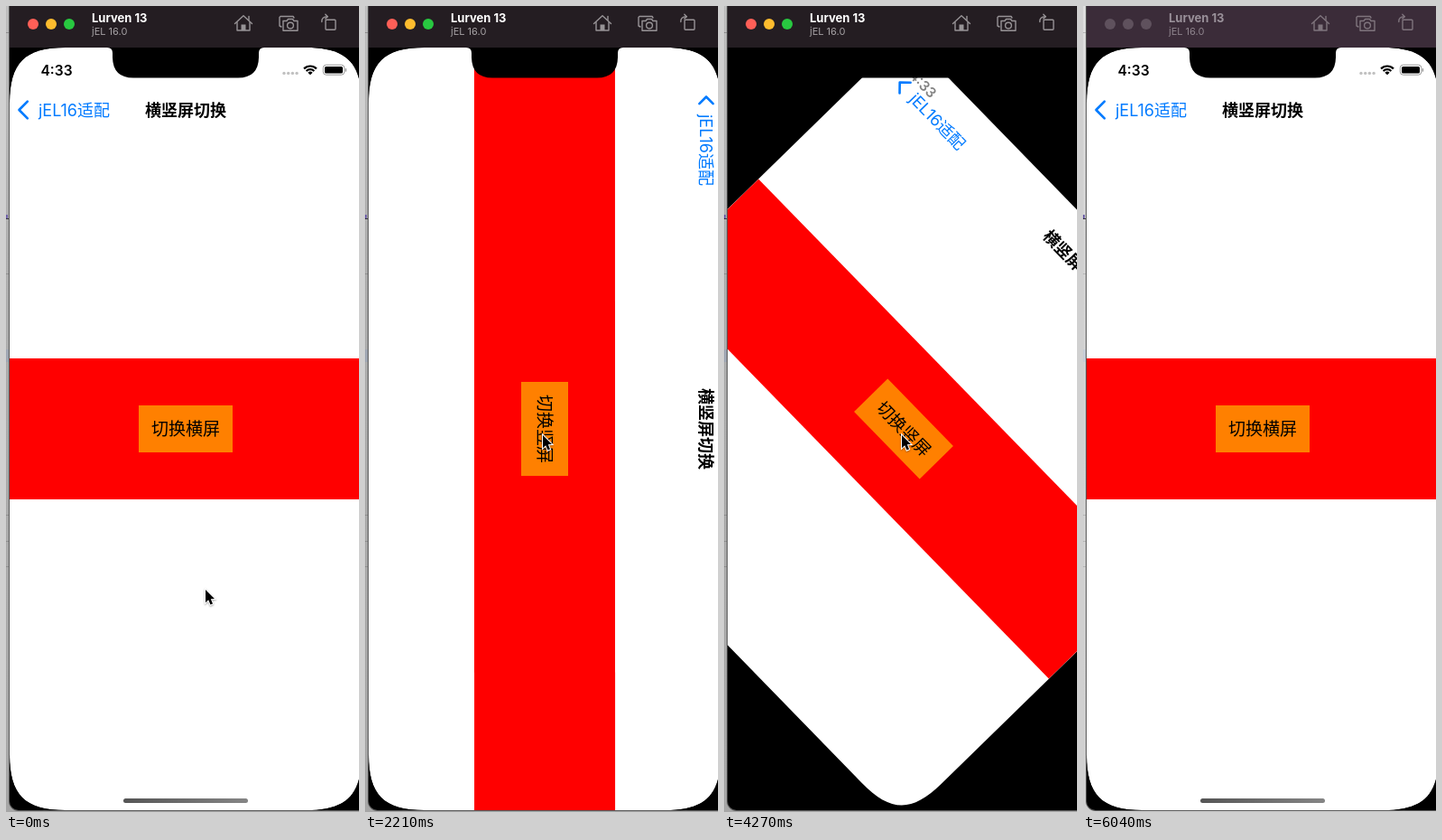
An HTML page with a canvas that plays this animation: 391 px wide and 892 px high, repeating every 6140 ms.

```html
<!DOCTYPE html>
<html lang="zh">
<head>
<meta charset="utf-8">
<title>横竖屏切换</title>
<style>
html, body { margin: 0; width: 100%; height: 100%; overflow: hidden; background: #000; }
canvas { display: block; width: 391px; height: 892px; }
</style>
</head>
<body>
<canvas id="stage" width="391" height="892"></canvas>
<script>
const ctx = document.getElementById('stage').getContext('2d');
const LOOP = 6140, SPIN = 300, INACTIVE = 6040;
const SCREEN = { x: 4, y: 46, w: 390, h: 844 };
const FONT = 'Inter, "Noto Sans CJK SC", "Noto Sans CJK", sans-serif';

const bursts = [
  [140, 580, 4], [880, 1620, 6], [1910, 2500, 5], [3090, 3090, 1],
  [3390, 3830, 4], [4120, 4710, 5], [5000, 5740, 6], [6040, 6040, 1]
];
const ticks = [0];
for (const [from, to, n] of bursts) {
  for (let i = 0; i < n; i++) {
    const t = from + (n > 1 ? (to - from) * i / (n - 1) : 0);
    ticks.push(Math.floor((t + 3) / 10) * 10);
  }
}

// Rotation starts, alternating between landscape and portrait.
const spins = [1902, 3251, 4118.5, 4907];

// Pointer path: time, x, y.
const pointer = [
  [0, 221, 646], [140, 217, 640], [290, 214, 623], [440, 222, 605],
  [580, 230, 594], [880, 236, 589], [1030, 238, 570], [1180, 227, 534],
  [1320, 211, 500], [1470, 200, 480], [1620, 197, 475]
];

const clamp = v => Math.min(1, Math.max(0, v));
const lerp = (a, b, k) => a + (b - a) * k;
const ease = k => (1 - Math.cos(Math.PI * clamp(k))) / 2;

function fillBox(x, y, w, h, color, r = 0) {
  ctx.fillStyle = color;
  ctx.beginPath();
  ctx.roundRect(x, y, w, h, r);
  ctx.fill();
}

function dot(x, y, r, color) {
  ctx.fillStyle = color;
  ctx.beginPath();
  ctx.arc(x, y, r, 0, 7);
  ctx.fill();
}

function line(points, close) {
  ctx.beginPath();
  points.forEach(([x, y]) => ctx.lineTo(x, y));
  if (close) ctx.closePath();
}

function text(str, x, y, size, weight, color, align = 'left') {
  ctx.font = `${weight} ${size}px ${FONT}`;
  ctx.textAlign = align;
  ctx.fillStyle = color;
  ctx.fillText(str, x, y);
}

// Rectangle with continuous corners.
function smoothRect(x, y, w, h) {
  const e = 62, c = 16.7, r = x + w, b = y + h;
  ctx.beginPath();
  ctx.moveTo(x, y + e);
  ctx.bezierCurveTo(x, y + c, x + c, y, x + e, y);
  ctx.lineTo(r - e, y);
  ctx.bezierCurveTo(r - c, y, r, y + c, r, y + e);
  ctx.lineTo(r, b - e);
  ctx.bezierCurveTo(r, b - c, r - c, b, r - e, b);
  ctx.lineTo(x + e, b);
  ctx.bezierCurveTo(x + c, b, x, b - c, x, b - e);
  ctx.closePath();
}

function drawBackdrop(inactive) {
  const shade = ctx.createLinearGradient(0, 0, 0, 892);
  shade.addColorStop(0, inactive ? '#dedede' : '#bdbdbd');
  shade.addColorStop(0.3, inactive ? '#d2d2d2' : '#adadad');
  shade.addColorStop(1, inactive ? '#cfcfcf' : '#a6a6a6');
  fillBox(0, 0, 391, 892, shade);
  fillBox(0, 380, 3, 14, inactive ? '#c6ccd6' : '#9fa6b2');
  for (const y of [29, 296, 563, 592, 620]) fillBox(0, y, 3, 1, inactive ? '#b5b5b5' : '#8e8e8e');
  fillBox(0, 231, 2, 4, '#6f61a8');
  fillBox(0, 235, 3, 1, '#37343f');
  fillBox(3, -20, 420, 911, '#595959', 11);
  fillBox(4, -20, 420, 910, '#000', 10);
}

function drawIcons(color) {
  ctx.strokeStyle = color;
  ctx.lineWidth = 1.4;
  ctx.lineJoin = ctx.lineCap = 'round';
  line([[253.5, 19.5], [263, 10.8], [272.5, 19.5]]); ctx.stroke();
  line([[256, 18], [256, 27], [270, 27], [270, 18]]); ctx.stroke();
  line([[269, 11.5], [269, 15.5]]); ctx.stroke();
  fillBox(260.5, 20.5, 5, 6.5, color);

  line([[305, 23], [303, 22], [303, 12.5], [304, 11.5], [318, 11.5], [319, 13]]); ctx.stroke();
  line([[307, 16.5], [311, 16.5], [312.5, 14.5], [317.5, 14.5], [319, 16.5],
    [323, 16.5], [323, 27.3], [307, 27.3]], true); ctx.stroke();
  ctx.beginPath(); ctx.arc(315, 21.6, 3.4, 0, 7); ctx.stroke();

  ctx.beginPath(); ctx.roundRect(354, 15.2, 11, 11, 1); ctx.stroke();
  ctx.beginPath();
  ctx.moveTo(349.8, 17.5);
  ctx.quadraticCurveTo(349.5, 11.7, 356, 11.7);
  ctx.stroke();
  line([[353.8, 9.3], [356.3, 11.7], [353.8, 14]]); ctx.stroke();
}

function drawTitleBar(inactive) {
  fillBox(4, 0, 387, 46, inactive ? '#3b2c39' : '#241d22');
  ['#ff5f57', '#febc2e', '#28c840'].forEach((c, i) =>
    dot(30 + 20 * i, 20, 6, inactive ? '#5f515d' : c));
  text('Lurven 13', 95, 18, 13, 700, inactive ? '#9a919a' : '#fff');
  text('jEL 16.0', 95, 32, 11, 400, inactive ? '#8d838c' : '#a4a0a3');
  drawIcons(inactive ? '#7f747d' : '#979396');
}

function drawStatus(w, alpha) {
  if (alpha < 0.02) return;
  ctx.save();
  ctx.globalAlpha = alpha;
  text('4:33', 52, 30.5, 15.5, 600, '#000', 'center');
  for (let i = 0; i < 4; i++) dot(w - 86 + 4.7 * i, 28.4, 1.7, '#c0c0c0');
  ctx.strokeStyle = ctx.fillStyle = '#000';
  ctx.lineCap = 'butt';
  ctx.lineWidth = 2.2;
  for (const r of [6.2, 9.8]) {
    ctx.beginPath();
    ctx.arc(w - 57, 30.3, r, -Math.PI * 0.75, -Math.PI * 0.25);
    ctx.stroke();
  }
  ctx.beginPath();
  ctx.moveTo(w - 57, 30.3);
  ctx.arc(w - 57, 30.3, 3.7, -Math.PI * 0.75, -Math.PI * 0.25);
  ctx.fill();
  ctx.strokeStyle = '#999';
  ctx.lineWidth = 1;
  ctx.beginPath(); ctx.roundRect(w - 42.7, 19.2, 23.5, 11, 3.3); ctx.stroke();
  fillBox(w - 41, 21, 20, 7.5, '#000', 1.6);
  fillBox(w - 18.3, 23, 1.4, 3.8, '#999', 1);
  ctx.restore();
}

function drawNavBar(w, turn) {
  const y = lerp(69, 16, turn), x = lerp(10.5, 54.5, turn), size = lerp(9.3, 7.6, turn);
  ctx.strokeStyle = '#007aff';
  ctx.lineWidth = 2.6;
  ctx.lineCap = ctx.lineJoin = 'round';
  line([[x + size, y - size], [x, y], [x + size, y + size]]);
  ctx.stroke();
  text('jEL16适配', lerp(32, 74, turn), y + 6.6, 18, 400, '#007aff');
  text('横竖屏切换', w / 2, y + 6.6, 18, 700, '#000', 'center');
}

function drawHomeBar(w, h, turn, alpha) {
  if (!alpha) return;
  const len = lerp(138, 217, turn), x = (w - len) / 2;
  let color = '#000';
  if (turn < 0.5) {
    color = ctx.createLinearGradient(x, 0, x + len, 0);
    color.addColorStop(0, '#555');
    color.addColorStop(1, '#858585');
  }
  ctx.globalAlpha = alpha;
  fillBox(x, h - 13, len, 5, color, 2.5);
  ctx.globalAlpha = 1;
}

function drawApp(turn, label, barAlpha) {
  const w = lerp(SCREEN.w, SCREEN.h, turn), h = lerp(SCREEN.h, SCREEN.w, turn);
  ctx.save();
  smoothRect(SCREEN.x, SCREEN.y, SCREEN.w, SCREEN.h);
  ctx.clip();
  ctx.translate(SCREEN.x + SCREEN.w / 2, SCREEN.y + SCREEN.h / 2);
  ctx.rotate(turn * Math.PI / 2);
  ctx.translate(-w / 2, -h / 2);
  smoothRect(0, 0, w, h);
  ctx.fillStyle = '#fff';
  ctx.fill();
  ctx.clip();
  fillBox(0, h / 2 - 78, w, 156, '#f00');
  fillBox(w / 2 - 52, h / 2 - 26, 104, 52, '#ff8000');
  text(label, w / 2, h / 2 + 6.8, 19, 400, '#000', 'center');
  drawStatus(w, 1 - turn);
  drawNavBar(w, turn);
  drawHomeBar(w, h, turn, barAlpha);
  ctx.restore();
}

function drawNotch() {
  ctx.fillStyle = '#000';
  ctx.beginPath();
  ctx.moveTo(112, 46);
  ctx.quadraticCurveTo(118, 46, 118, 52);
  ctx.lineTo(118, 57);
  ctx.quadraticCurveTo(118.5, 79.5, 141, 79.5);
  ctx.lineTo(257, 79.5);
  ctx.quadraticCurveTo(279.5, 79.5, 280, 57);
  ctx.lineTo(280, 52);
  ctx.quadraticCurveTo(280, 46, 286, 46);
  ctx.fill();
}

function drawPointer(t) {
  const [, x, y] = pointer.filter(p => p[0] <= t + 12).pop();
  ctx.save();
  ctx.translate(x, y);
  line([[0, 0], [0, 14.2], [3.2, 11.2], [5.5, 16.6], [8, 15.5], [5.8, 10.3], [10, 10.1]], true);
  ctx.lineJoin = 'miter';
  ctx.lineWidth = 2;
  ctx.strokeStyle = '#fff';
  ctx.shadowColor = 'rgba(0,0,0,.35)';
  ctx.shadowBlur = 2;
  ctx.shadowOffsetY = 1;
  ctx.stroke();
  ctx.shadowColor = 'transparent';
  ctx.fillStyle = '#000';
  ctx.fill();
  ctx.restore();
}

function draw(time) {
  const t = ticks.filter(k => k <= time).pop();
  const inactive = t >= INACTIVE;
  const index = spins.filter(s => s <= t).length - 1;
  let turn = 0, barAlpha = 1;
  if (index >= 0) {
    const age = t - spins[index], k = ease(age / SPIN);
    turn = index % 2 ? 1 - k : k;
    barAlpha = clamp((age - SPIN - 50) / 220);
  }
  const upright = (t >= 1910 && t < 3090) || (t >= 4120 && t < 5000);
  drawBackdrop(inactive);
  drawApp(turn, upright ? '切换竖屏' : '切换横屏', barAlpha);
  drawNotch();
  drawTitleBar(inactive);
  if (!inactive) drawPointer(t);
}

const start = performance.now();
function tick() {
  draw((performance.now() - start) % LOOP);
  requestAnimationFrame(tick);
}
tick();
</script>
</body>
</html>
```
